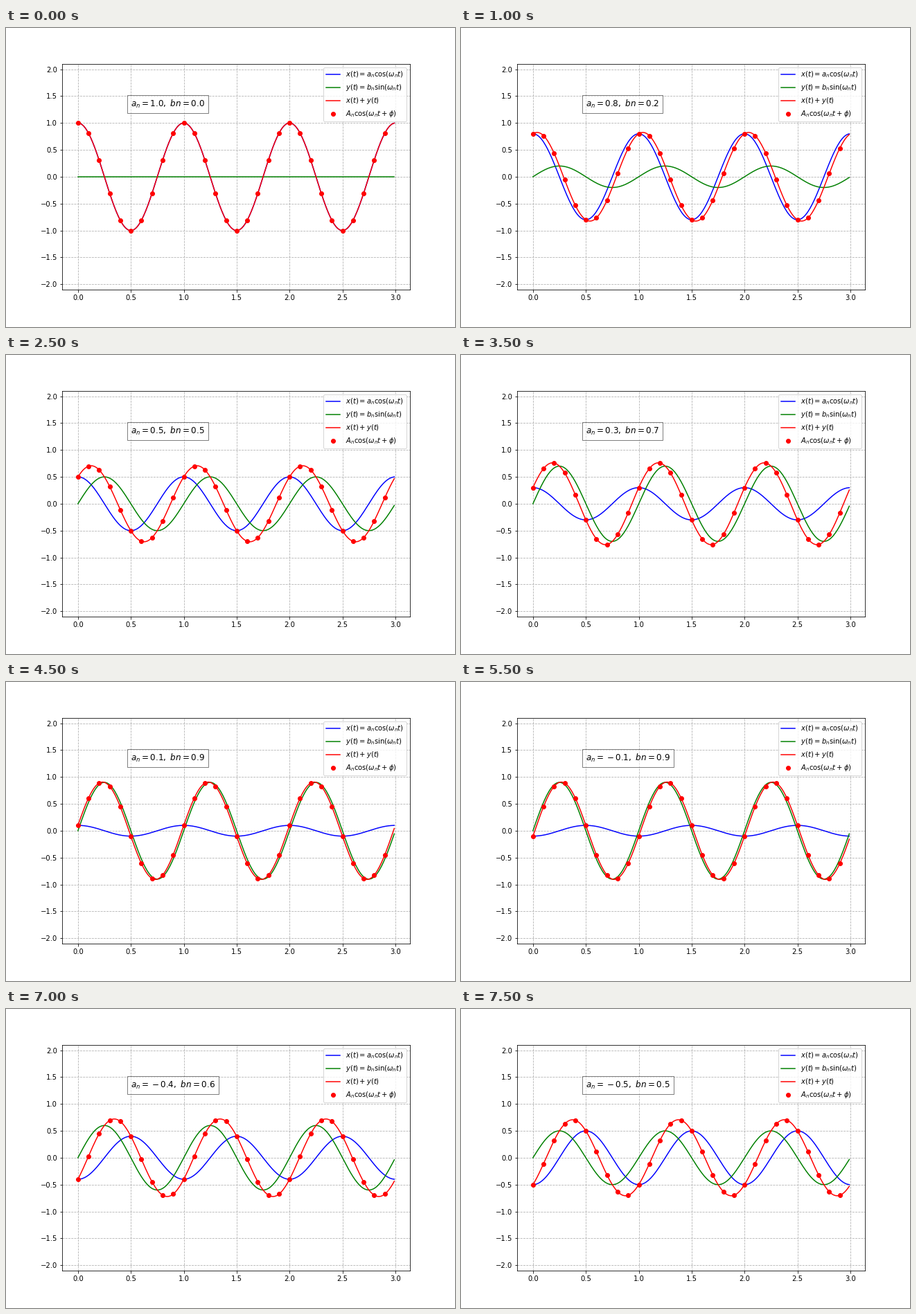
Write a matplotlib script that moves like this. It is 648 by 432 pixels and loops after 8 s.

```python
import numpy as np
import matplotlib.pyplot as plt
from matplotlib.animation import FuncAnimation

FRAMES = 16
INTERVAL = 500
OMEGA = 2 * np.pi

t = np.arange(0, 3, 0.01)
t_dots = t[::10]

fig, ax = plt.subplots(figsize=(9, 6), dpi=72)
fig.subplots_adjust(left=0.125, right=0.9, bottom=0.125, top=0.88)
ax.set_xlim(-0.1495, 3.1395)
ax.set_ylim(-2.1, 2.1)
ax.grid(linestyle="--")

cos_line, = ax.plot([], [], "b", label=r"$x(t) = a_n \cos(\omega_n t)$")
sin_line, = ax.plot([], [], "g", label=r"$y(t) = b_n \sin(\omega_n t)$")
sum_line, = ax.plot([], [], "r", label=r"$x(t) + y(t)$")
dots, = ax.plot([], [], "ro", label=r"$A_n \cos(\omega_n t + \phi)$")
ax.legend(loc="upper right")

note = ax.text(0.5, 1.3, "", fontsize=12,
               bbox=dict(facecolor="white", alpha=0.5, pad=5))


def update(k):
    a = (10 - k) / 10
    b = 1 - abs(a)
    x = a * np.cos(OMEGA * t)
    y = b * np.sin(OMEGA * t)
    cos_line.set_data(t, x)
    sin_line.set_data(t, y)
    sum_line.set_data(t, x + y)

    amp, phase = np.hypot(a, b), np.arctan2(-b, a)
    dots.set_data(t_dots, amp * np.cos(OMEGA * t_dots + phase))
    note.set_text(rf"$a_n = {a:.1f}, \ bn = {b:.1f}$")
    return cos_line, sin_line, sum_line, dots, note


anim = FuncAnimation(fig, update, frames=FRAMES, interval=INTERVAL,
                     repeat=True, repeat_delay=0)
plt.show()
```
